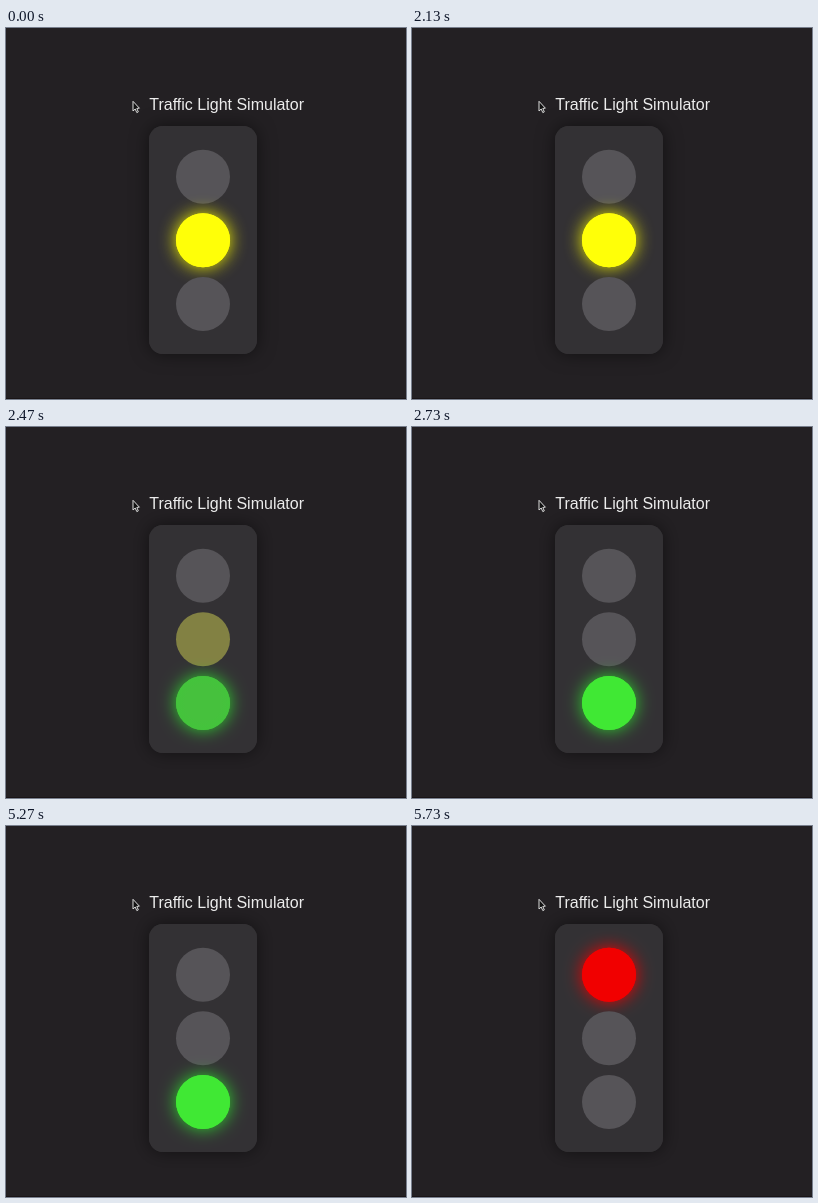
An HTML page with a canvas that plays this animation: 400x371 px, repeating every 8000 ms.

```html
<!DOCTYPE html>
<html lang="en">
<head>
<meta charset="utf-8">
<title>Traffic Light Simulator</title>
<style>
  html, body { margin: 0; width: 100%; height: 100%; overflow: hidden; background: #232023; }
  canvas { display: block; }
</style>
</head>
<body>
<canvas id="stage" width="400" height="371"></canvas>
<script>
const ctx = document.getElementById('stage').getContext('2d');
const LOOP = 8000, STEP = 200 / 3, FADE = 450;
const OFF = [86, 84, 88];
const RADIUS = 27, CENTER_X = 197;

// Each lamp switches on and off at the given times.
const lamps = [
  { y: 148.7, color: [241, 0, 0], glow: '#f00000', on: 5268, off: Infinity },
  { y: 212.2, color: [255, 255, 8], glow: '#f4f400', on: -1000, off: 2268 },
  { y: 276, color: [64, 232, 52], glow: '#2fd52f', on: 2268, off: 5268 }
];

const clamp = v => Math.min(1, Math.max(0, v));
const mix = (a, b, p) => `rgb(${a.map((v, i) => Math.round(v + (b[i] - v) * p))})`;
const bezier = (a, b, u) => 3 * a * u * (1 - u) ** 2 + 3 * b * u * u * (1 - u) + u ** 3;

// Same curve as the CSS "ease" timing function.
function ease(x) {
  if (x <= 0 || x >= 1) return clamp(x);
  let lo = 0, hi = 1;
  for (let i = 0; i < 20; i++) {
    const mid = (lo + hi) / 2;
    if (bezier(0.25, 0.25, mid) < x) lo = mid; else hi = mid;
  }
  return bezier(0.1, 1, lo);
}

function disc(y, fill) {
  ctx.fillStyle = fill;
  ctx.beginPath();
  ctx.arc(CENTER_X, y, RADIUS, 0, Math.PI * 2);
  ctx.fill();
}

function setShadow(color, blur) {
  ctx.shadowColor = color;
  ctx.shadowBlur = blur;
}

function drawLamp(lamp, t) {
  const lit = t >= lamp.on && t < lamp.off;
  const level = ease((t - lamp.on) / FADE) * (1 - ease((t - lamp.off) / FADE));
  const fill = mix(OFF, lamp.color, level);
  if (lit) {
    setShadow(lamp.glow, 17);
    disc(lamp.y, fill);
    setShadow('transparent', 0);
  }
  disc(lamp.y, fill);
  if (lit && level < 1) {
    const rim = ctx.createRadialGradient(CENTER_X, lamp.y, RADIUS - 9, CENTER_X, lamp.y, RADIUS);
    rim.addColorStop(0, lamp.glow + '00');
    rim.addColorStop(1, lamp.glow + '70');
    ctx.globalAlpha = 1 - level;
    disc(lamp.y, rim);
    ctx.globalAlpha = 1;
  }
}

function drawPanel() {
  ctx.fillStyle = '#333134';
  ctx.beginPath();
  ctx.roundRect(143, 98, 108, 228, 14);
  setShadow('rgba(0, 0, 0, 0.5)', 18);
  ctx.fill();
  setShadow('transparent', 0);
  ctx.fill();
}

function drawPointer() {
  const points = [[127, 73.3], [127, 83], [129.2, 81], [130.8, 84.6],
    [132.3, 83.9], [130.8, 80.4], [133.4, 80.2]];
  ctx.beginPath();
  points.forEach(([x, y]) => ctx.lineTo(x, y));
  ctx.closePath();
  ctx.fillStyle = '#111';
  ctx.fill();
  ctx.strokeStyle = '#dcdcdc';
  ctx.lineWidth = 1;
  ctx.stroke();
}

function draw(t) {
  ctx.fillStyle = '#232023';
  ctx.fillRect(0, 0, 400, 371);
  ctx.fillStyle = '#191416';
  ctx.fillRect(0, 370, 400, 1);
  drawPanel();
  lamps.forEach(lamp => drawLamp(lamp, t));
  ctx.fillStyle = '#ececec';
  ctx.font = '16px "Liberation Sans", Arial, sans-serif';
  ctx.fillText('Traffic Light Simulator', 143.3, 81.5);
  drawPointer();
}

const start = performance.now();
function tick() {
  const t = (performance.now() - start) % LOOP;
  draw(Math.floor((t + 4) / STEP) * STEP);
  requestAnimationFrame(tick);
}
tick();
</script>
</body>
</html>
```
